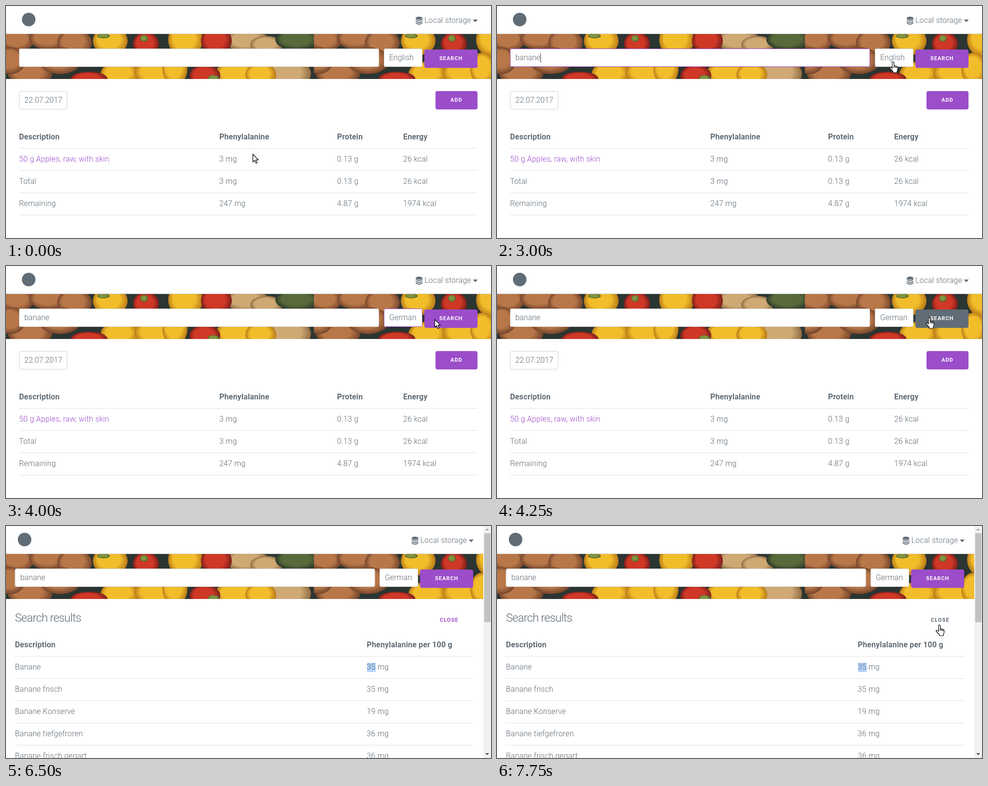
Recreate the animation shown at these times as an HTML page with a canvas. Size 1005x480 px, loop 8000 ms.

```html
<!DOCTYPE html>
<html lang="en">
<head>
<meta charset="utf-8">
<title>Food diary search</title>
<style>
html, body { margin: 0; width: 100%; height: 100%; overflow: hidden; background: #fff; }
#stage { position: absolute; left: 0; top: 0; width: 1005px; height: 480px; overflow: hidden; }
canvas, #words { position: absolute; left: 0; top: 0; }
#words span {
  position: absolute; white-space: pre; line-height: 24px;
  font: 300 16px/24px Roboto, sans-serif; letter-spacing: .16px; color: #606c76;
}
#words .field { letter-spacing: 0; }
#words .head { font-weight: 700; }
#words .title { font-size: 24px; letter-spacing: -.9px; }
#words .button { font-size: 11px; font-weight: 700; letter-spacing: 1px; }
</style>
</head>
<body>
<div id="stage">
  <canvas id="base" width="1005" height="480"></canvas>
  <div id="words"></div>
  <canvas id="top" width="1005" height="480"></canvas>
</div>
<script>
const W = 1005, H = 480, LOOP = 8000, STEP = 250;
const GREY = '#606c76', PURPLE = '#9b4dca', LINE = '#e1e1e1', BORDER = '#d1d1d1';
const c = document.getElementById('base').getContext('2d');
const over = document.getElementById('top').getContext('2d');
const words = document.getElementById('words');

// step at which each pointer position begins
const pointer = [
  [0, 'arrow', 511, 306], [1, 'arrow', 490, 220], [2, 'beam', 448, 119],
  [10, 'beam', 560, 115], [11, 'beam', 720, 113], [12, 'hand', 813, 115],
  [14, 'arrow', 815, 155], [15, 'arrow', 840, 140], [16, 'arrow', 888, 110],
  [17, 'hand', 888, 106], [18, 'arrow', 790, 205], [19, 'arrow', 550, 288],
  [20, 'arrow', 729, 287], [21, 'arrow', 742, 289], [22, 'beam', 757, 293],
  [24, 'beam', 763, 294], [25, 'none', 0, 0], [27, 'arrow', 830, 380],
  [28, 'arrow', 915, 424], [29, 'arrow', 978, 390], [30, 'arrow', 945, 280],
  [31, 'hand', 909, 204]
];
const typed = [[5, 'b'], [6, 'ban'], [7, 'banan'], [8, 'banane']];
const latest = (list, n) => list.filter(e => e[0] <= n).pop();

function text(str, x, y, kind = '', color = '') {
  const s = document.createElement('span');
  s.textContent = str;
  s.className = kind;
  s.style.left = x + 'px';
  s.style.top = y - 12 + 'px';
  if (color) s.style.color = color;
  words.append(s);
  return s;
}

function rect(x, y, w, h, color) {
  c.fillStyle = color;
  c.fillRect(x, y, w, h);
}

function round(x, y, w, h, color) {
  c.fillStyle = color;
  c.beginPath();
  c.roundRect(x, y, w, h, 4);
  c.fill();
}

function poly(points, color) {
  c.fillStyle = color;
  c.beginPath();
  points.forEach(p => c.lineTo(...p));
  c.fill();
}

function field(str, x, y, w, focus) {
  round(x, y, w, 38, '#fff');
  c.strokeStyle = focus ? PURPLE : BORDER;
  c.lineWidth = 1;
  c.beginPath();
  c.roundRect(x + .5, y + .5, w - 1, 37, 3.5);
  c.stroke();
  return text(str, x + 11, y + 19, 'field');
}

function button(str, x, y, w, color) {
  round(x, y, w, 38, color);
  text(str, x + 31, y + 19, 'button', '#fff');
}

// soft vegetable shapes on a dark ground, repeated across the banner
function makePhoto() {
  const tile = document.createElement('canvas');
  tile.width = 638;
  tile.height = 93;
  const g = tile.getContext('2d');
  g.fillStyle = '#2b3531';
  g.fillRect(0, 0, 638, 93);
  const groups = [
    ['#b87748', '#74452c', [[24, 12, 34, 24], [88, 10, 40, 22], [142, 18, 36, 28], [50, 82, 46, 24], [10, 55, 30, 28], [112, 55, 44, 28]]],
    ['#cfa974', '#8f6c42', [[500, 14, 46, 22], [540, 22, 34, 18], [586, 82, 46, 32]]],
    ['#596a3a', '#2c3a2b', [[604, 12, 46, 22]]],
    ['#f2bd2b', '#b97b17', [[216, 14, 36, 30], [372, 12, 36, 36], [236, 82, 40, 25], [312, 80, 46, 28], [350, 72, 26, 34], [478, 82, 44, 27], [528, 84, 32, 24]]],
    ['#cf3826', '#7d1f1c', [[290, 20, 27, 24], [436, 14, 32, 28], [172, 92, 38, 14], [412, 86, 32, 22]]],
    ['#81933f', '#4c6129', [[286, 9, 8, 7], [202, 4, 13, 5], [430, 91, 12, 6]]]
  ];
  for (const [light, dark, blobs] of groups)
    for (const [x, y, rx, ry] of blobs) {
      g.save();
      g.translate(x, y);
      g.scale(rx, ry);
      const shade = g.createRadialGradient(-.2, -.25, .1, 0, 0, 1);
      shade.addColorStop(0, light);
      shade.addColorStop(.6, light);
      shade.addColorStop(1, dark);
      g.fillStyle = shade;
      g.beginPath();
      g.arc(0, 0, 1, 0, 7);
      g.fill();
      g.restore();
    }
  return tile;
}
const photo = makePhoto();

function header(dx) {
  c.fillStyle = GREY;
  c.beginPath();
  c.arc(47 + dx, 28, 14, 0, 7);
  c.fill();

  // storage icon
  const x = 856 + dx;
  c.beginPath();
  c.ellipse(x, 25, 7, 3, 0, 0, 7);
  c.fill();
  for (const y of [27.5, 31.5, 35]) {
    c.beginPath();
    c.moveTo(x - 7, y - 1);
    c.quadraticCurveTo(x, y + 4, x + 7, y - 1);
    c.lineTo(x + 7, y + 1);
    c.quadraticCurveTo(x, y + 6, x - 7, y + 1);
    c.fill();
  }
  text('Local storage', 867 + dx, 30);
  poly([[967.5 + dx, 28], [977.5 + dx, 28], [972.5 + dx, 33.5]], GREY);

  rect(0, 57, W, 1, BORDER);
  c.drawImage(photo, 0, 58);
  c.drawImage(photo, 638, 58);
}

function row(cells, cols, y, kind) {
  cells.forEach((s, i) => text(s, cols[i], y, kind));
}

function diary() {
  field('22.07.2017', 27, 176, 100);
  button('ADD', 890, 176, 87, PURPLE);
  const cols = [27, 442, 686, 823];
  row(['Description', 'Phenylalanine', 'Protein', 'Energy'], cols, 271, 'head');
  row(['50 g Apples, raw, with skin', '3 mg', '0.13 g', '26 kcal'], cols, 317);
  row(['Total', '3 mg', '0.13 g', '26 kcal'], cols, 363);
  row(['Remaining', '247 mg', '4.87 g', '1974 kcal'], cols, 409);
  words.querySelectorAll('span').forEach(s => {
    if (s.textContent.startsWith('50 g')) s.style.color = PURPLE;
  });
  for (let i = 0; i < 4; i++) rect(27, 294 + i * 46, 950, 1, LINE);
}

function results(n) {
  text('Search results', 18.5, 189.5, 'title');
  text('CLOSE', 899, 195, 'button', n > 30 ? GREY : PURPLE);
  if (n >= 23) rect(748, 283, 18, 19, '#b3d4fc');
  const cols = [18.5, 747.5];
  row(['Description', 'Phenylalanine per 100 g'], cols, 246, 'head');
  [['Banane', 35], ['Banane frisch', 35], ['Banane Konserve', 19],
   ['Banane tiefgefroren', 36], ['Banane frisch gegart', 36]].forEach(([name, mg], i) => {
    row([name, mg + ' mg'], cols, 292 + i * 46);
    rect(18, 269 + i * 46, 951, 1, LINE);
  });

  // scrollbar
  rect(989, 0, 16, H, '#f1f1f1');
  rect(991, 15, 13, 184, '#c1c1c1');
  poly([[993, 9], [1001, 9], [997, 5]], '#a3a3a3');
  poly([[993, 470], [1001, 470], [997, 474]], '#505050');
}

function options(n) {
  const pick = n === 13 ? 0 : 1;
  rect(783, 126, 80, 46, BORDER);
  rect(784, 126, 78, 45, '#fff');
  rect(784, 126 + pick * 22, 78, 23, '#1e90ff');
  ['English', 'German'].forEach((s, i) =>
    text(s, 794, 137 + i * 22, 'field', i === pick ? '#fff' : ''));
}

const shapes = {
  arrow: new Path2D('M.5 .5V16.8L4.3 13.3 7 19.3 9.6 18.2 7 12.4H12Z'),
  hand: new Path2D('M6 13V2.5a1.8 1.8 0 0 1 3.6 0V9q1.7-.9 3 .6 1.7-.7 2.7.8 2.2-.4 2.2 2V16q0 2-1.5 4V23H7.5V20.5L1.2 14q-1-2 .8-2.4 1.5 0 4 2.6Z'),
  beam: new Path2D('M-3 -6H-1L0 -5 1 -6H3M0 -5V5M-3 6H-1L0 5 1 6H3'),
  none: new Path2D()
};

function drawPointer([, kind, x, y]) {
  over.clearRect(0, 0, W, H);
  over.save();
  over.translate(x, y);
  over.lineWidth = 1.2;
  over.lineJoin = 'round';
  over.fillStyle = '#fff';
  over.strokeStyle = kind === 'beam' ? '#c4c4c4' : '#000';
  if (kind !== 'beam') over.fill(shapes[kind]);
  over.stroke(shapes[kind]);
  if (kind === 'hand') over.stroke(new Path2D('M9.6 9V13M12.6 10V13M15.2 11V13.5'));
  over.restore();
}

function draw(n) {
  const found = n >= 18, dx = found ? -8.5 : 0, bx = found ? -9 : 0;
  words.textContent = '';
  rect(0, 0, W, H, '#fff');
  header(dx);

  const query = (latest(typed, n) || [0, ''])[1];
  const typing = n >= 3 && n < 13;
  const box = field(query, found ? 18.5 : 27, 88, 746, typing);
  if (typing) rect(Math.round(38 + box.getBoundingClientRect().width), 98, 1, 19, '#333');
  field(n < 15 ? 'English' : 'German', 783 + bx, 88, 80, n >= 13 && n < 17);
  button('SEARCH', 867 + bx, 90, 110, n >= 17 && n < 23 ? GREY : PURPLE);

  found ? results(n) : diary();
  if (n === 13 || n === 14) options(n);
  drawPointer(latest(pointer, n));
}

let shown = -1;
const start = performance.now();
function tick() {
  const n = Math.floor((performance.now() - start) % LOOP / STEP);
  if (n !== shown) draw(shown = n);
  requestAnimationFrame(tick);
}
tick();
</script>
</body>
</html>
```
